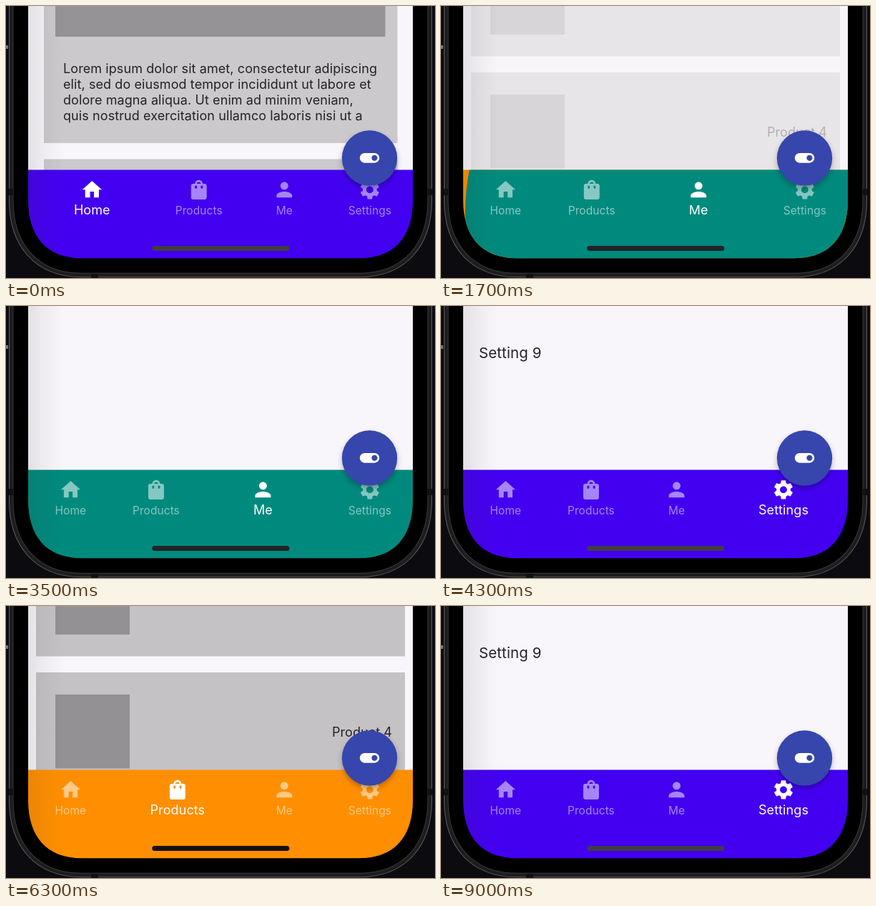
These frames come from a looping animation (600 px wide and 381 px high, 9.1 s). An HTML page:

```html
<!DOCTYPE html>
<html lang="en">
<head>
<meta charset="utf-8">
<title>Shifting bottom bar</title>
<style>
  html, body { margin: 0; width: 100%; height: 100%; overflow: hidden; background: #0b0b10; }
  svg { display: block; width: 100vw; height: 100vh; }
  text { font-family: Inter, sans-serif; font-size: 18px; letter-spacing: .09px; fill: #242226; }
  .tab, .tab text { fill: #fff; }
  .tab text { text-anchor: middle; }
</style>
</head>
<body>
<svg viewBox="0 0 600 381" preserveAspectRatio="none">
  <defs>
    <path id="glass" d="M31 -40V272C31 322 56 353.300 106 353.300H494C544 353.300 569 322 569 272V-40Z"/>
    <clipPath id="screen"><use href="#glass"/></clipPath>
    <clipPath id="bar"><rect x="30" y="229.500" width="540" height="125"/></clipPath>
    <linearGradient id="edge">
      <stop offset="0" stop-color="#40303a" stop-opacity=".11"/>
      <stop offset=".4" stop-color="#40303a" stop-opacity=".055"/>
      <stop offset="1" stop-color="#40303a" stop-opacity="0"/>
    </linearGradient>
    <filter id="soft" x="-50%" y="-50%" width="200%" height="200%">
      <feGaussianBlur stdDeviation="4"/>
    </filter>
  </defs>

  <!-- phone body: rings around the glass -->
  <rect width="600" height="381" fill="#0b0b10"/>
  <rect y="55" width="3" height="5" fill="#77777a"/>
  <use href="#glass" stroke="#5c5c5e" stroke-width="54"/>
  <use href="#glass" stroke="#1d1d1f" stroke-width="52"/>
  <use href="#glass" stroke="#38383a" stroke-width="43"/>
  <use href="#glass" stroke="#000" stroke-width="41"/>
  <path d="M4 256h6v9h-6zM590 256h6v9h-6zM119 375h10v6h-10z" fill="#111113"/>

  <g clip-path="url(#screen)">
    <rect x="31" width="538" height="231" fill="#f8f6fa"/>

    <g class="page">
      <path d="M53 0H547.500V192H53zM53 214.500H547.500V231H53z" fill="#cbc9cc"/>
      <path d="M69 0H530.500V43H69z" fill="#959396"/>
      <text x="80" y="94">Lorem ipsum dolor sit amet, consectetur adipiscing</text>
      <text x="80" y="116">elit, sed do eiusmod tempor incididunt ut labore et</text>
      <text x="80" y="138">dolore magna aliqua. Ut enim ad minim veniam,</text>
      <text x="80" y="160">quis nostrud exercitation ullamco laboris nisi ut a</text>
    </g>
    <g class="page">
      <path d="M42 0H558V70.500H42zM42 93H558V231H42z" fill="#c4c2c5"/>
      <path d="M69 0H173V40H69zM69 124H173V227.500H69z" fill="#939194"/>
      <text x="540" y="182.500" text-anchor="end">Product 4</text>
    </g>
    <g class="page"></g>
    <g class="page">
      <text x="53" y="72.500" style="font-size:20.500px">Setting 9</text>
    </g>

    <g clip-path="url(#bar)">
      <rect id="base" x="30" y="229" width="540" height="126"/>
      <circle id="ripple" cy="291"/>
    </g>
    <rect x="31" width="50" height="354" fill="url(#edge)"/>
    <g id="tabs"></g>
    <rect id="pill" x="204.300" y="336" width="192" height="7" rx="3.500"/>

    <circle cx="508.500" cy="217" r="38" opacity=".3" filter="url(#soft)"/>
    <circle cx="508.500" cy="213" r="38.700" fill="#3746ad"/>
    <path transform="translate(492.100 196.400) scale(1.370)" fill="#fff" d="M17 7H7c-2.760 0-5 2.240-5 5s2.240 5 5 5h10c2.760 0 5-2.240 5-5s-2.240-5-5-5zm0 8c-1.660 0-3-1.340-3-3s1.340-3 3-3 3 1.340 3 3-1.340 3-3 3z"/>
  </g>
</svg>

<script>
const LOOP = 9100, SHIFT = 600, FADE = 190;
const LEFT = 30.6, WIDTH = 538;

const tabs = [
  { label: 'Home', color: '#4300f0', pill: '#3f3d41',
    icon: 'M10 20v-6h4v6h5v-8h3L12 3 2 12h3v8z' },
  { label: 'Products', color: '#ff8f00', pill: '#17110d',
    icon: 'M18 6h-2c0-2.21-1.79-4-4-4S8 3.79 8 6H6c-1.1 0-2 .9-2 2v12c0 1.1.9 2 2 2h12c1.1 0 2-.9 2-2V8c0-1.1-.9-2-2-2zm-8 4c0 .55-.45 1-1 1s-1-.45-1-1V8h2v2zm2-6c1.1 0 2 .9 2 2h-4c0-1.1.9-2 2-2zm4 6c0 .55-.45 1-1 1s-1-.45-1-1V8h2v2z' },
  { label: 'Me', color: '#008a7d', pill: '#222326',
    icon: 'M12 12c2.21 0 4-1.79 4-4s-1.79-4-4-4-4 1.79-4 4 1.79 4 4 4zm0 2c-2.67 0-8 1.34-8 4v2h16v-2c0-2.66-5.33-4-8-4z' },
  { label: 'Settings', color: '#4300f0', pill: '#3f3d41',
    icon: 'M19.14 12.94c.04-.3.06-.61.06-.94 0-.32-.02-.64-.07-.94l2.03-1.58c.18-.14.23-.41.12-.61l-1.92-3.32c-.12-.22-.37-.29-.59-.22l-2.39.96c-.5-.38-1.03-.7-1.62-.94l-.36-2.54c-.04-.24-.24-.41-.48-.41h-3.84c-.24 0-.43.17-.47.41l-.36 2.54c-.59.24-1.13.57-1.62.94l-2.39-.96c-.22-.08-.47 0-.59.22L2.74 8.87c-.12.21-.08.47.12.61l2.03 1.58c-.05.3-.09.63-.09.94s.02.64.07.94l-2.03 1.58c-.18.14-.23.41-.12.61l1.92 3.32c.12.22.37.29.59.22l2.39-.96c.5.38 1.03.7 1.62.94l.36 2.54c.05.24.24.41.48.41h3.84c.24 0 .44-.17.47-.41l.36-2.54c.59-.24 1.13-.56 1.62-.94l2.39.96c.22.08.47 0 .59-.22l1.92-3.32c.12-.22.07-.47-.12-.61l-2.01-1.58zM12 15.6c-1.98 0-3.6-1.62-3.6-3.6s1.62-3.6 3.6-3.6 3.6 1.62 3.6 3.6-1.62 3.6-3.6 3.6z' }
];

// [time, tab index]
const taps = [[-SHIFT, 0], [820, 2], [1640, 1], [2600, 2], [3510, 3],
              [4440, 0], [5500, 1], [6600, 2], [7500, 3]];

const $ = id => document.getElementById(id);
const clamp = v => Math.min(1, Math.max(0, v));

// cubic-bezier(.4, 0, .2, 1), solved by bisection
function ease(x) {
  let lo = 0, hi = 1;
  for (let i = 0; i < 24; i++) {
    const s = (lo + hi) / 2, r = 1 - s;
    if (1.2 * r * r * s + 0.6 * r * s * s + s ** 3 < x) lo = s; else hi = s;
  }
  return lo * lo * (3 - 2 * lo);
}

$('tabs').innerHTML = tabs.map(t =>
  `<g class="tab"><path transform="translate(-16.4 240.9) scale(1.37)" d="${t.icon}"/><text>${t.label}</text></g>`
).join('');
const tabEls = [...document.querySelectorAll('.tab')];
const pages = [...document.querySelectorAll('.page')];

function draw(t) {
  let k = taps.length - 1;
  while (k && taps[k][0] > t) k--;
  const [start, cur] = taps[k];
  const prev = k ? taps[k - 1][1] : cur;
  const x = clamp((t - start) / SHIFT);
  const p = x === 1 ? 1 : ease(x);
  const fade = clamp((t - start) / FADE);
  const mix = (i, v) => i === cur ? (prev === cur ? 1 : v) : i === prev ? 1 - v : 0;

  const unit = WIDTH / 4.5;
  let pos = LEFT, prevX = 0;
  tabEls.forEach((el, i) => {
    const sel = mix(i, p), w = unit * (1 + sel / 2), cx = pos + w / 2;
    pos += w;
    if (i === prev) prevX = cx;
    el.setAttribute('transform', `translate(${cx} 0)`);
    el.setAttribute('opacity', 0.52 + 0.48 * sel);
    el.lastChild.setAttribute('transform', `translate(0 292.2) scale(${0.86 + 0.14 * sel})`);
    pages[i].setAttribute('opacity', mix(i, fade));
  });

  // the old colour closes into its own tab
  const reach = Math.hypot(Math.max(prevX - LEFT, LEFT + WIDTH - prevX), 62);
  $('base').setAttribute('fill', tabs[cur].color);
  $('ripple').setAttribute('fill', tabs[prev].color);
  $('ripple').setAttribute('cx', prevX);
  $('ripple').setAttribute('r', reach * (1 - p));
  $('pill').setAttribute('fill', tabs[p < 0.5 ? prev : cur].pill);
}

function tick() {
  draw(performance.now() % LOOP);
  requestAnimationFrame(tick);
}
tick();
</script>
</body>
</html>
```
